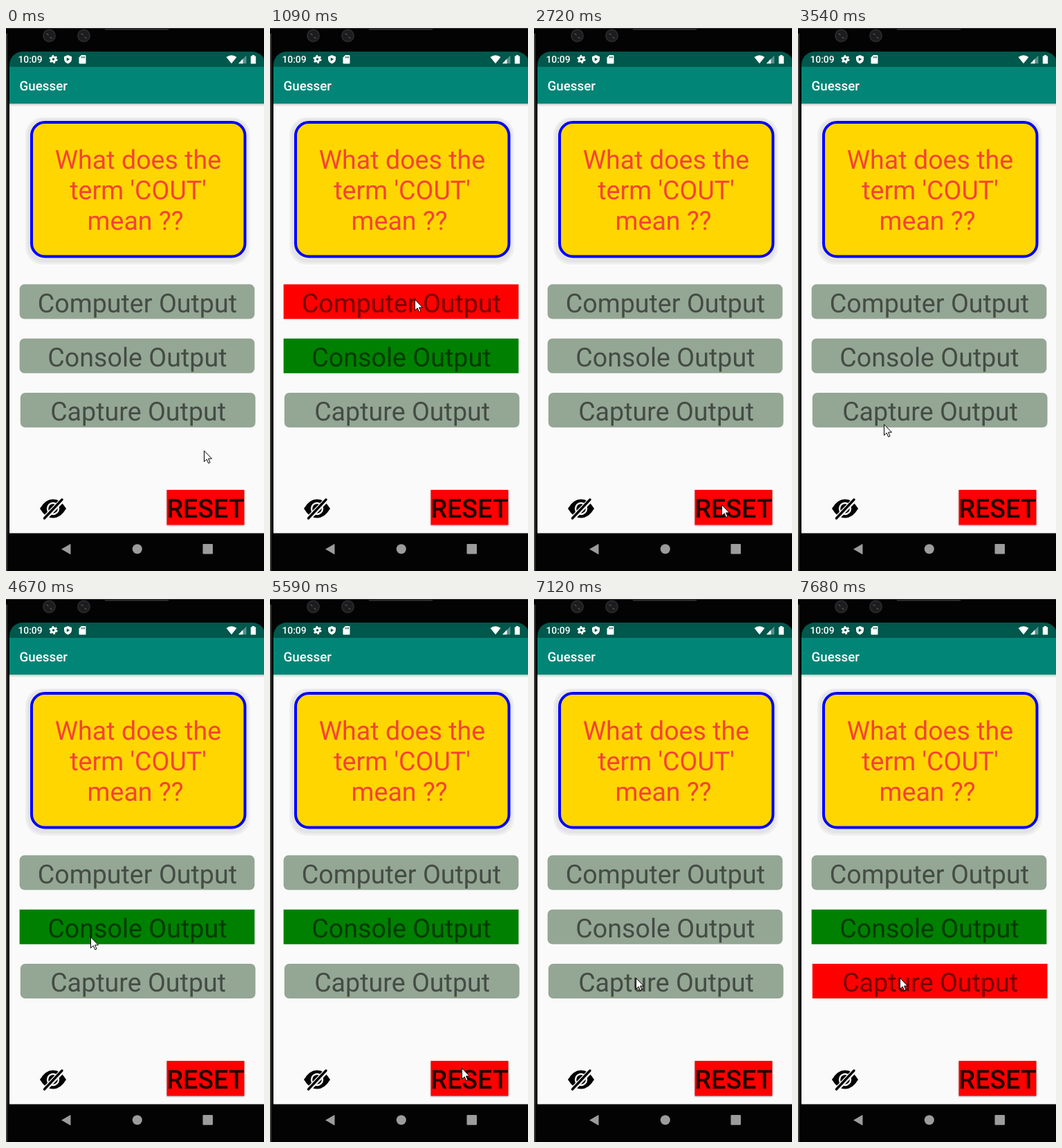
Animation of 373 by 783 pixels, one loop 8 s. Source, as an HTML page:

```html
<!DOCTYPE html>
<html lang="en">
<head>
<meta charset="utf-8">
<title>Quiz app</title>
<style>
  html, body { margin: 0; width: 100%; height: 100%; overflow: hidden; background: #000; }
  svg { display: block; font-family: Roboto, sans-serif; text-rendering: geometricPrecision; }
  .medium { font-weight: 500; }
  .large { font-size: 37.64px; text-anchor: middle; }
  .question { fill: #f44336; }
  .answer text { fill-opacity: .54; }
  #reset { filter: drop-shadow(0 1.5px 1px rgba(0, 0, 0, .36)); }
  #reset.raised { filter: drop-shadow(0 4px 2.2px rgba(0, 0, 0, .36)); }
</style>
</head>
<body>
<svg width="373" height="783" viewBox="0 0 373 783">
  <defs>
    <linearGradient id="barShadow" x2="0" y2="1">
      <stop stop-color="#c4c4c4"/><stop offset="1" stop-color="#fafafa"/>
    </linearGradient>
    <clipPath id="screen"><rect x="5" y="34" width="370" height="800" rx="19"/></clipPath>
    <g id="lens">
      <circle r="8.5" fill="#1c1c1e" stroke="#29292b" stroke-width="2"/>
      <path d="M-4-3l3 2M1 2l3 2" stroke="#555" stroke-width="1.5"/>
    </g>
  </defs>

  <!-- phone body -->
  <rect width="373" height="783" fill="#030303"/>
  <path d="M1 8V783" stroke="#3c3c3c" stroke-width="2"/>
  <path d="M0 .5H373" stroke="#333"/>
  <path d="M143 1.5H235" stroke="#2b2b2b" stroke-width="3"/>
  <use href="#lens" x="62.5" y="11"/>
  <use href="#lens" x="112.5" y="11"/>

  <!-- app bars -->
  <g clip-path="url(#screen)">
    <rect y="34" width="373" height="23" fill="#00574b"/>
    <rect y="56" width="373" height="53" fill="#008577"/>
    <rect y="109" width="373" height="619.5" fill="#fafafa"/>
    <rect y="109" width="373" height="4" fill="url(#barShadow)"/>
  </g>
  <g fill="#fff">
    <text class="medium" x="17.5" y="50" font-size="13.8">10:09</text>
    <g fill="none" stroke="#fff">
      <circle cx="68.5" cy="45" r="3.2" stroke-width="2.8"/>
      <circle cx="68.5" cy="45" r="5.2" stroke-width="1.8" stroke-dasharray="2.7 2.745"/>
    </g>
    <path d="M89.5 39l5.5 2.2v3.6q0 4.7-5.5 6.7q-5.5-2-5.5-6.7v-3.6z"/>
    <path d="M87.8 42.5l4.4 2.6-4.4 2.6z" fill="#00574b"/>
    <path d="M109 39h5.5q1 0 1 1v10.5q0 1-1 1h-8q-1 0-1-1v-8z"/>
    <path d="M109 42.2h5" stroke="#00574b" stroke-width="2.5" stroke-dasharray="1 1"/>
    <path d="M318.5 42q7.500-5.500 15 0l-7.500 9.300z"/>
    <path d="M336 51.300l11.500-11.800v11.800z" opacity=".35"/>
    <path d="M336 51.300l6.500-6.700v6.700z"/>
    <path d="M353.800 40.500h2v-1.500h3.400v1.500h2v11h-7.400z"/>
    <text class="medium" x="19.500" y="90" font-size="18.800">Guesser</text>
  </g>

  <!-- question card -->
  <rect x="28" y="129" width="325" height="212" rx="25" fill="#eee"/>
  <rect x="31" y="131" width="319" height="207" rx="23" fill="#e4e4e4"/>
  <rect x="37" y="136" width="308.500" height="193.500" rx="19" fill="#ffd600" stroke="#00f" stroke-width="4"/>
  <g class="large question">
    <text x="191" y="203">What does the</text>
    <text x="191" y="247">term 'COUT'</text>
    <text x="187" y="291">mean ??</text>
  </g>

  <g id="answers" class="large"></g>

  <!-- hidden eye -->
  <path d="M49 693Q57 679.500 68 679.500T87 693Q79 706.500 68 706.500T49 693Z"/>
  <circle cx="68" cy="693" r="8" stroke="#fafafa" stroke-width="2.400"/>
  <path d="M54 709L84 678" stroke="#fafafa" stroke-width="7"/>
  <path d="M55.500 707L81 680" stroke="#000" stroke-width="3.400" stroke-linecap="round"/>

  <rect id="reset" x="232.500" y="666" width="112" height="50.500" fill="#f00"/>
  <text class="large medium" x="288.500" y="706" fill="#210000">RESET</text>

  <!-- navigation -->
  <g fill="#9c9c9c">
    <path d="M80 751.500l13.500-7.700v15.400z"/>
    <circle cx="189.800" cy="751.200" r="7"/>
    <rect x="284.500" y="744" width="14.500" height="14.500" rx="1"/>
  </g>

  <path id="pointer" d="M.5.7V16.300l3.700-3.400l2.500 5.700l2.300-1l-2.400-5.600h4.900z" fill="#fff" stroke="#000"/>
</svg>

<script>
const LOOP = 8000;
const CAPTURE_STEP = 130;  // the pointer is only redrawn this often
const PRESS = 160;         // how long the reset button is held
const LABELS = ['Computer Output', 'Console Output', 'Capture Output'];
const CORRECT = 1;
const IDLE_COLOR = '#94a694', RIGHT_COLOR = '#008000', WRONG_COLOR = '#f00';

// Each move shows its first step at "from" and rests at x, y from "to" on.
const moves = [
  { from: 0, to: 0, x: 286, y: 609 },
  { from: 150, to: 410, x: 209, y: 391 },
  { from: 1690, to: 1690, x: 196, y: 551 },
  { from: 1840, to: 2200, x: 271, y: 687 },
  { from: 2870, to: 3110, x: 148, y: 536 },
  { from: 3250, to: 3540, x: 124, y: 571 },
  { from: 3970, to: 4090, x: 136, y: 472 },
  { from: 4250, to: 4250, x: 122, y: 487 },
  { from: 5200, to: 5320, x: 314, y: 717 },
  { from: 5470, to: 5720, x: 261, y: 659 },
  { from: 5860, to: 5990, x: 257, y: 694 },
  { from: 6720, to: 7120, x: 147, y: 546 }
];
// A click picks an answer; without one it resets the quiz.
const clicks = [
  { at: 1090, answer: 0 }, { at: 2600 },
  { at: 4670, answer: 1 }, { at: 6570 },
  { at: 7680, answer: 2 }
];

const easeOut = t => 1 - (1 - t) ** 3;

function add(parent, name, attributes) {
  const node = parent.appendChild(document.createElementNS('http://www.w3.org/2000/svg', name));
  for (const key in attributes) node.setAttribute(key, attributes[key]);
  return node;
}

const boxes = LABELS.map((label, i) => {
  const x = i < 2 ? 19.6 : 20.8, y = 369.6 + 78.2 * i;
  const group = add(document.getElementById('answers'), 'g', { class: 'answer' });
  const box = add(group, 'rect', { x, y, width: 339.8, height: 50 });
  add(group, 'text', { x: x + 170.3, y: y + 40.4 }).textContent = label;
  return box;
});
const reset = document.getElementById('reset');
const pointer = document.getElementById('pointer');

function pointerAt(time) {
  const index = moves.findLastIndex(move => move.from <= time);
  const move = moves[index], start = moves[index - 1] ?? move;
  const steps = Math.round((move.to - move.from) / CAPTURE_STEP) + 1;
  const step = Math.floor((time - move.from) / CAPTURE_STEP) + 1;
  const progress = time >= move.to ? 1 : easeOut(Math.min(1, step / steps));
  return ['x', 'y'].map(axis => Math.round(start[axis] + (move[axis] - start[axis]) * progress));
}

function answerColor(index, picked) {
  if (picked === undefined) return IDLE_COLOR;
  if (index === CORRECT) return RIGHT_COLOR;
  return index === picked ? WRONG_COLOR : IDLE_COLOR;
}

function draw(time) {
  pointer.setAttribute('transform', `translate(${pointerAt(time)})`);

  const picked = clicks.findLast(click => click.at <= time)?.answer;
  boxes.forEach((box, i) => {
    const color = answerColor(i, picked);
    box.setAttribute('fill', color);
    box.setAttribute('rx', color === IDLE_COLOR ? 7 : 0);
  });

  const next = clicks.find(click => click.at > time);
  const pressed = next && next.answer === undefined && next.at - time <= PRESS;
  reset.classList.toggle('raised', Boolean(pressed));
}

const begin = performance.now();
function tick() {
  draw((performance.now() - begin) % LOOP);
  requestAnimationFrame(tick);
}
tick();
</script>
</body>
</html>
```
